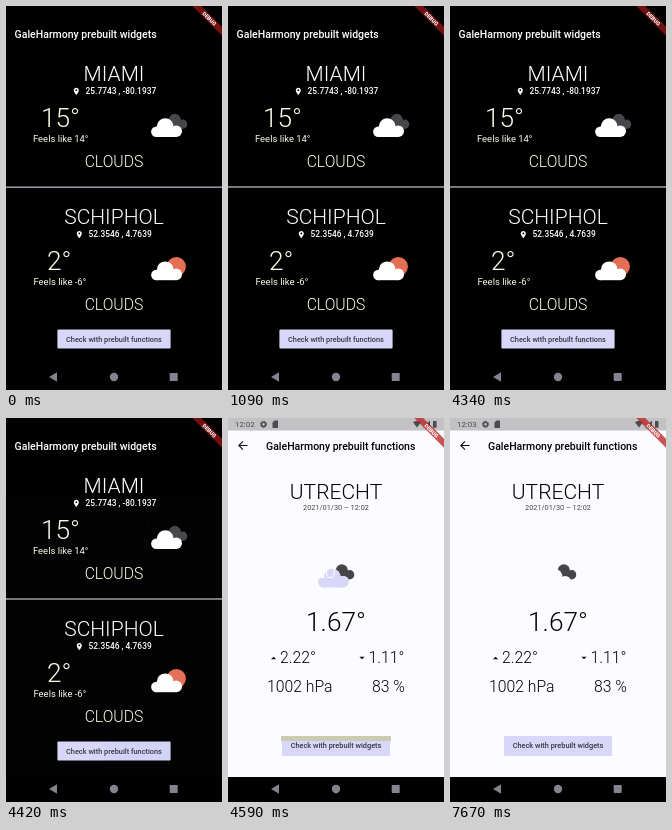
Recreate the animation shown at these times as an HTML page. Size 216x384 px, loop 8 s.

```html
<!DOCTYPE html>
<html lang="en">
<head>
<meta charset="utf-8">
<title>Weather widgets</title>
<style>
  html, body { margin: 0; width: 100%; height: 100%; overflow: hidden; background: #000; }
  svg { display: block; width: 100vw; height: 100vh; }
  text { font-family: Roboto, sans-serif; white-space: pre; }
  .mid { text-anchor: middle; }
  .title { font-size: 10.5px; font-weight: 500; }
  .city { font-size: 21px; font-weight: 300; }
  .coords { font-size: 8.4px; font-weight: 500; }
  .temp { font-size: 26.25px; font-weight: 300; }
  .feels { font-size: 9.45px; }
  .detail { font-size: 15.75px; font-weight: 300; }
  .small { font-size: 7.35px; }
  .label { font-size: 7.35px; font-weight: 500; fill: #36363e; }
  .clock { font-size: 7.9px; }
  .warm { fill: #fbfbe8; }
</style>
</head>
<body>
<svg viewBox="0 0 216 384">
  <defs>
    <g id="cloud">
      <circle cx="5.3" cy="14.8" r="5.2"/>
      <circle cx="14.2" cy="9.6" r="8.4"/>
      <circle cx="25.2" cy="14.2" r="5.8"/>
      <rect x="5.3" y="12" width="20" height="8"/>
    </g>
    <use id="backCloud" href="#cloud" transform="translate(13.3 -4.2) scale(.74 .8)"/>
    <path id="pin" transform="scale(.36) translate(-12 -12)" d="M12 2C8.13 2 5 5.13 5 9c0 5.25 7 13 7 13s7-7.75 7-13c0-3.87-3.13-7-7-7zm0 9.5a2.5 2.5 0 0 1 0-5 2.5 2.5 0 0 1 0 5z"/>
    <rect id="button" x="51.4" y="323.4" width="113.2" height="19.2" rx="1"/>
    <clipPath id="buttonClip"><use href="#button"/></clipPath>
  </defs>

  <rect width="216" height="384"/>

  <g id="widgets" fill="#fff">
    <text class="title" x="8.6" y="31.5">GaleHarmony prebuilt widgets</text>
    <rect id="divider" y="180.5" width="216"/>
    <g id="reports"></g>
    <use href="#button" fill="#d8d7fa"/>
    <circle id="ripple" cx="134" cy="335" fill="#5b58a0" clip-path="url(#buttonClip)"/>
    <text class="label mid" x="108" y="335.7">Check with prebuilt functions</text>
  </g>

  <g id="functions">
    <rect id="page" width="216" height="384"/>
    <path d="M19.5 27.5h-8.5M15 23.3l-4.2 4.2 4.2 4.2" fill="none" stroke="#111" stroke-width="1.1"/>
    <text class="title" x="38" y="31.5">GaleHarmony prebuilt functions</text>
    <path id="spinner" fill="none" stroke="#10107a" stroke-width="2.2"/>
    <g id="loaded">
      <text class="city mid" x="108" y="80.5">UTRECHT</text>
      <text class="small mid" x="108" y="92.3" fill="#444">2021/01/30 – 12:02</text>
      <g transform="translate(90 149.5)">
        <use href="#backCloud" fill="#464648"/>
        <use href="#cloud" fill="#fcfbff"/>
        <g id="cloudTint">
          <use href="#cloud" fill="#d8d7fa"/>
          <text class="detail" x="-11" y="10.5" fill="#fff">CLO</text>
        </g>
      </g>
      <text class="temp mid" x="108" y="213">1.67°</text>
      <path d="M43 241.3h5.2l-2.6-2.6zM131.4 238.7h5.2l-2.6 2.6z"/>
      <text class="detail" x="52" y="245.3">2.22°</text>
      <text class="detail" x="140.5" y="245.3">1.11°</text>
      <text class="detail" x="39" y="274">1002 hPa</text>
      <text class="detail" x="144" y="274">83 %</text>
      <rect x="54" y="318" width="108" height="20" rx="1" fill="#d8d7fa"/>
      <rect id="buttonTint" x="53" y="318" width="110" height="5" fill="#c9cbb2"/>
      <text class="label mid" x="108" y="330.3">Check with prebuilt widgets</text>
    </g>
  </g>

  <g id="status" fill="#4b4b50">
    <rect width="216" height="12.5" fill="#c2c1c3"/>
    <text id="clock" class="clock" x="7" y="9.2"></text>
    <circle cx="35.5" cy="6.3" r="2.1" fill="none" stroke="#4b4b50" stroke-width="1.5"/>
    <circle cx="35.5" cy="6.3" r="3.1" fill="none" stroke="#4b4b50" stroke-width="1" stroke-dasharray="1.2 1.235"/>
    <path d="M44.5 4.5l2-2h3.5v7.5h-5.5zM185 4.2q4-3 8 0l-4 5.3zM202 2.5v7h-7zM205 3h3.5v6.8H205z"/>
  </g>

  <rect y="359" width="216" height="25"/>
  <g fill="#85838f">
    <path d="M43 371l8-4.7v9.4z"/>
    <circle cx="108" cy="371" r="4.2"/>
    <rect x="163.7" y="367" width="8" height="8" rx=".7"/>
  </g>

  <g transform="translate(216 0) rotate(45) scale(.525)">
    <rect id="banner" x="-40" y="28" width="80" height="12" fill="#b71c1c"/>
    <text class="mid" y="37.7" font-size="10.2" font-weight="900" fill="#fff">DEBUG</text>
  </g>
</svg>

<script>
const LOOP = 8000;
const PRESS = 4330, SLIDE_START = 4410, SLIDE_TIME = 180, LOADED = 4580, MINUTE = 5250;
const $ = id => document.getElementById(id);
const progress = (time, start, length) => Math.min(1, Math.max(0, (time - start) / length));
const set = (id, attributes) => {
  for (const name in attributes) $(id).setAttribute(name, attributes[name]);
};

const report = (top, city, coords, pinX, temp, tempX, feels, feelsX, behind) => `
  <g transform="translate(0 ${top})">
    <text class="city mid" x="108" y="75.3">${city}</text>
    <use href="#pin" x="${pinX}" y="85.3"/>
    <text class="coords" x="${pinX + 9.3}" y="88">${coords}</text>
    <text class="temp warm" x="${tempX}" y="120.7">${temp}°</text>
    <text class="feels warm" x="${feelsX}" y="136">Feels like ${feels}°</text>
    <g transform="translate(145 111)">${behind}<use href="#cloud"/></g>
    <text class="detail warm mid" x="108" y="160.5">CLOUDS</text>
  </g>`;

$('reports').innerHTML =
  report(0, 'MIAMI', '25.7743 , -80.1937', 70.3, 15, 35, 14, 27,
    '<use href="#backCloud" fill="#46464a"/>') +
  report(143.2, 'SCHIPHOL', '52.3546 , 4.7639', 73.3, 2, 41, -6, 27.5,
    '<circle cx="25.3" cy="6.4" r="9.6" fill="#e56f55"/>');

function spinnerArc(time) {
  const point = angle => `${108 + 9 * Math.cos(angle)} ${201 + 9 * Math.sin(angle)}`;
  const start = -1.4 + progress(time, SLIDE_START, SLIDE_TIME) * .4;
  return `M${point(start)}A9 9 0 0 1 ${point(start + .8)}`;
}

function draw(time) {
  const settle = progress(time, 40, 360);
  set('divider', { height: 1.4 - .4 * settle, fill: settle < .5 ? '#a9a8bc' : '#eeeef0' });

  const press = progress(time, PRESS, 120);
  set('ripple', { r: 2 + 60 * press * press, opacity: press > 0 ? .15 * (1 - press) : 0 });

  const slide = progress(time, SLIDE_START, SLIDE_TIME);
  set('functions', {
    opacity: slide ** 1.6,
    transform: `translate(0 ${90 * (1 - slide) ** 2.25})`
  });

  const loaded = time >= LOADED;
  set('page', { fill: loaded ? '#fcfbff' : '#e0ddff' });
  set('spinner', { d: spinnerArc(time), opacity: loaded ? 0 : 1 });
  set('loaded', { opacity: loaded ? 1 : 0 });
  const tint = 1 - progress(time, 4620, 250);
  set('cloudTint', { opacity: tint });
  set('buttonTint', { opacity: tint });

  set('status', { opacity: progress(slide, .6, .4) });
  $('clock').textContent = time < MINUTE ? '12:02' : '12:03';
  set('banner', { opacity: slide > .6 ? .75 : .63 });
}

function tick() {
  draw(performance.now() % LOOP);
  requestAnimationFrame(tick);
}
tick();
</script>
</body>
</html>
```
